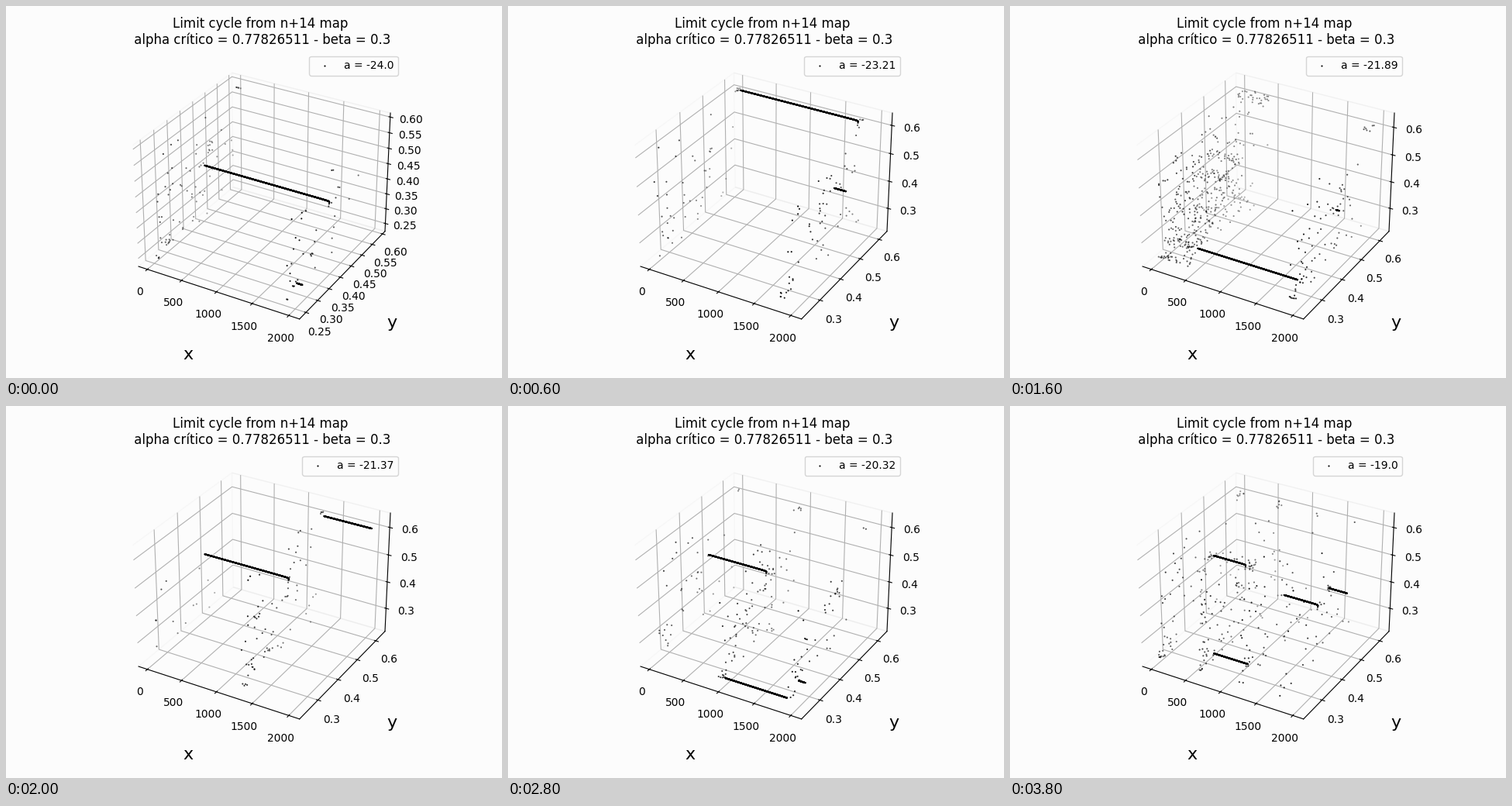
Animation, 640 px wide and 480 px high, one loop 4 s. Source, as a matplotlib script:

```python
import numpy as np
import matplotlib.pyplot as plt
from matplotlib.animation import FuncAnimation

FRAMES, FIRST, LAST = 20, 14, 2000
LEVELS = np.linspace(-24, -19, FRAMES)
ORBIT = np.array([0.241, 0.279, 0.431, 0.469, 0.611])

plt.rcParams.update({"figure.facecolor": "#fcfcfc", "axes.facecolor": "#fcfcfc"})
fig = plt.figure(figsize=(6.4, 4.8), dpi=100)
ax = fig.add_subplot(projection="3d")


def bump(i, center, width):
    return np.exp(-((i - center) / width) ** 2)


def laminar_phases(i):
    """Yield (start, end, value) of the calm stretches between bursts."""
    # type-I intermittency: length goes with 1 / sqrt(distance to tangency)
    length = 1 / np.sqrt(2.85e-7 + 720 * np.exp(LEVELS[i]))
    burst = 9 * abs(i - 9.3) + 440 * bump(i, 8, 1)
    pause = 40 + 4 * i + 250 * bump(i, 5.5, 1.5)
    # the first branch swings between orbit points, then settles
    swing = 0.44 + 0.0015 * i + 0.16 * np.sin(0.2 * np.pi * i) * (i < 10)
    branch = int(np.argmin(abs(ORBIT - swing)))
    step = int(i / 6.3) or -1

    start, visit = FIRST + burst, 1
    while start < LAST:
        end = min(start + length, LAST)
        yield int(start), int(end), ORBIT[branch]
        start, visit = end + pause / visit, visit + 1
        branch, step = (branch + step) % len(ORBIT), 1


def value_range(i):
    settle = np.exp(-i / 2)
    return 0.2395 + 0.0085 * settle, 0.624 - 0.036 * settle


def series(i):
    rng = np.random.default_rng(40 + i)
    low, high = value_range(i)
    n = np.arange(FIRST, LAST + 1)
    # chaotic bursts: scattered values, some close to the periodic orbit
    free = low + (high - low) * rng.beta(1, 1.6, (2, n.size))
    close = rng.choice(ORBIT, n.size) + rng.normal(0, 0.009, (2, n.size))
    y, z = np.where(rng.random(n.size) < 0.3, close, free)
    for start, end, value in laminar_phases(i):
        calm = (n >= start) & (n <= end)
        left = end - n[calm] + 1
        # upper branches drop away as the phase breaks up
        bend = 0.012 if value > 0.4 and end < LAST else 0
        y[calm] = value - bend / (left + 1)
        z[calm] = value - bend / left
    return n, np.clip(y, low, high), np.clip(z, low, high)


def padded(low, high):
    pad = (0.05 + 1.1 / 48) * (high - low)
    return low - pad, high + pad


def update(i):
    ax.clear()
    ax.scatter(*series(i), c="k", s=2.3, linewidths=0,
               label=f"a = {round(float(LEVELS[i]), 2)}")

    low, high = value_range(i)
    limits = padded(low, high)
    step, digits = (0.05, 2) if high - low < 0.35 else (0.1, 1)
    ticks = np.arange(np.ceil(limits[0] / step) * step, 0.61, step)
    ax.set(xlim=padded(FIRST, LAST), ylim=limits, zlim=limits,
           xticks=range(0, 2001, 500), yticks=ticks, zticks=ticks)
    for axis in (ax.yaxis, ax.zaxis):
        axis.set_major_formatter(f"{{x:.{digits}f}}")
    for axis in (ax.xaxis, ax.yaxis, ax.zaxis):
        axis.pane.set_fill(False)

    ax.set_xlabel("x", fontsize=16, labelpad=20)
    ax.set_ylabel("y", fontsize=16, labelpad=20)
    ax.set_title("Limit cycle from n+14 map\n alpha crítico = 0.77826511 - beta = 0.3")
    ax.legend(loc="upper right")


anim = FuncAnimation(fig, update, frames=FRAMES, interval=200,
                     repeat=True, repeat_delay=0)
plt.show()
```
